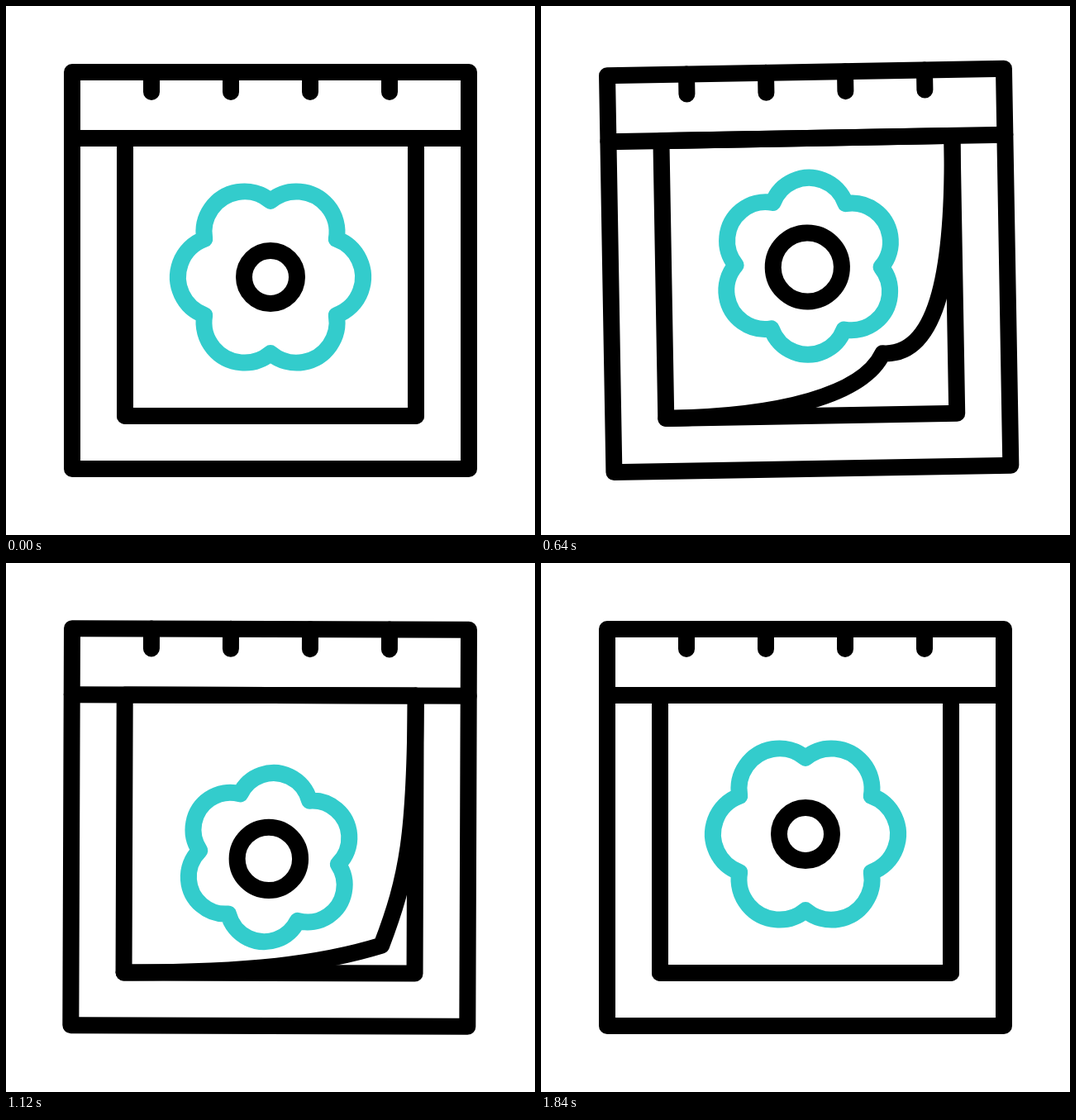
Write an HTML page with a canvas that moves like this. It is 640 by 640 pixels and loops after 2000 ms.

```html
<!DOCTYPE html>
<html lang="en">
<head>
<meta charset="utf-8">
<title>Calendar</title>
<style>
  html, body { margin: 0; width: 100%; height: 100%; overflow: hidden; background: #fff; }
  canvas { display: block; width: 640px; height: 640px; }
</style>
</head>
<body>
<canvas id="stage"></canvas>
<script>
const LOOP = 2000, STEP = 40, END = 1840;
const BLACK = '#000', TEAL = '#33cccc';
const RAD = Math.PI / 180;

const canvas = document.getElementById('stage');
const ctx = canvas.getContext('2d');
const ratio = window.devicePixelRatio || 1;
canvas.width = canvas.height = 640 * ratio;

// Smooth rise from 0 to 1 between two times.
function ease(t, from, to) {
  const x = Math.min(1, Math.max(0, (t - from) / (to - from)));
  return x * x * (3 - 2 * x);
}

// Rises to 1 at the peak and falls back to 0.
const pulse = (t, from, peak, to) => ease(t, from, peak) - ease(t, peak, to);

// Three swings in a row, each fading into the next.
const swing = (t, a, b, c) =>
  a * pulse(t, 0, 440, 840) + b * pulse(t, 440, 840, 1280) + c * pulse(t, 840, 1280, END);

function line(x1, y1, x2, y2) {
  ctx.beginPath();
  ctx.moveTo(x1, y1);
  ctx.lineTo(x2, y2);
  ctx.stroke();
}

function drawFrame() {
  ctx.strokeStyle = BLACK;
  ctx.strokeRect(80, 80, 480, 480);
  ctx.strokeRect(144, 160, 352, 336);
  line(80, 160, 560, 160);
  for (let x = 176; x < 480; x += 96) line(x, 80, x, 104);
}

// Lower and right page edges meet at the lifted corner.
function drawPage(k) {
  const x = 496 - 89 * k, y = 496 - 74.5 * k;
  ctx.beginPath();
  ctx.moveTo(144, 496);
  ctx.bezierCurveTo(305 - 22 * k, 496, 383, 496 - 24.5 * k, x, y);
  ctx.bezierCurveTo(496 - 20 * k, 338 + 90 * k, 496, 340 - 25 * k, 496, 160);
  ctx.stroke();
}

function drawFlower(x, y, scale, angle) {
  ctx.strokeStyle = TEAL;
  ctx.beginPath();
  for (let i = 0; i < 6; i++) {
    const a = (angle + 60 * i) * RAD, d = 63 * scale;
    ctx.arc(x + d * Math.cos(a), y + d * Math.sin(a), 49 * scale, a - 70 * RAD, a + 70 * RAD);
  }
  ctx.closePath();
  ctx.stroke();
}

function drawCore(x, y, r) {
  ctx.strokeStyle = BLACK;
  ctx.beginPath();
  ctx.arc(x, y, r, 0, 2 * Math.PI);
  ctx.stroke();
}

function draw(t) {
  ctx.setTransform(ratio, 0, 0, ratio, 0, 0);
  ctx.fillStyle = '#fff';
  ctx.fillRect(0, 0, 640, 640);
  ctx.lineWidth = 20;
  ctx.lineCap = ctx.lineJoin = 'round';

  // The calendar hangs from the middle of its top edge.
  ctx.translate(320, 80);
  ctx.rotate(swing(t, -5, 3, -1) * RAD);
  ctx.translate(-320, -80);

  drawFrame();
  drawPage(pulse(t, 0, 600, 1580));

  const y = 328 - 25 * pulse(t, 440, 840, 1160) + 32 * pulse(t, 840, 1160, 1520);
  const shrink = pulse(t, 0, 440, 840) + pulse(t, 840, 1160, 1760);
  const grow = ease(t, 0, 440) - ease(t, 640, END);
  drawFlower(320 - shrink, y - 1.5 * shrink, 1 - 0.09 * shrink, swing(t, 59.5, 4, 49));
  drawCore(320 - 1.8 * grow, y + 0.5 * grow, 32 + 9.6 * grow);
}

const start = performance.now();
function tick() {
  const t = (performance.now() - start) % LOOP;
  draw(Math.floor(t / STEP) * STEP);
  requestAnimationFrame(tick);
}
tick();
</script>
</body>
</html>
```
